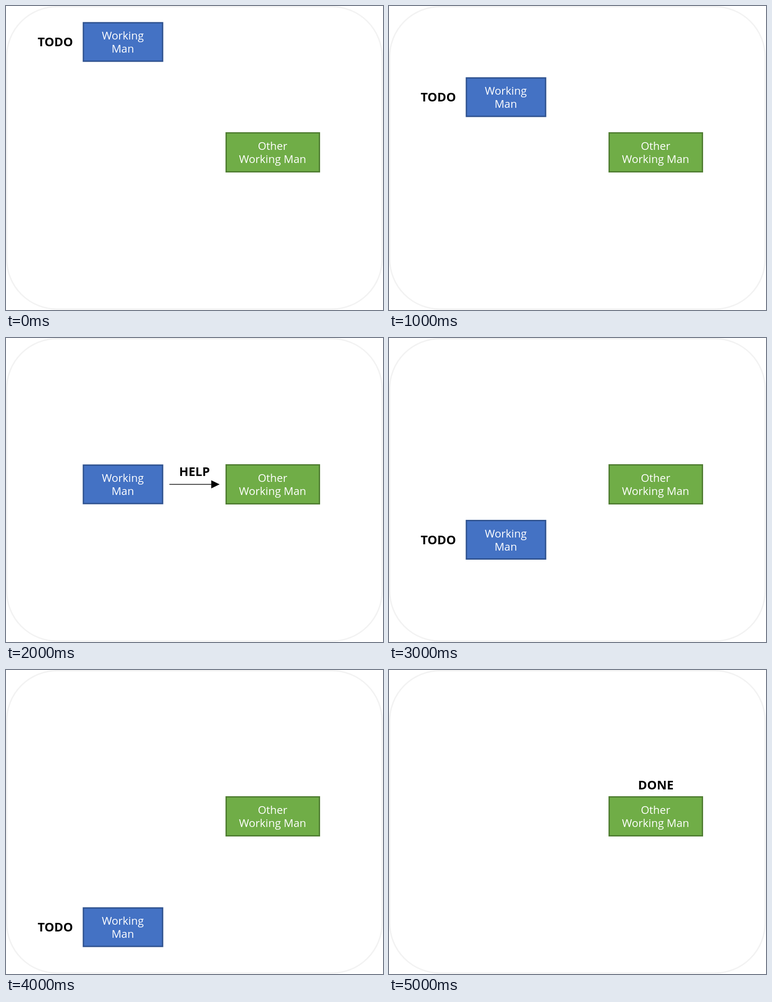
An HTML page for the animation above (6 s loop, 833x672 px).

```html
<!DOCTYPE html>
<html lang="en">
<head>
<meta charset="utf-8">
<title>Working Man</title>
<style>
  html, body { margin: 0; width: 100%; height: 100%; overflow: hidden; background: #fff; }
  svg { display: block; width: 833px; height: 672px; }
  text { font: 24px "Open Sans", "Noto Sans", sans-serif; fill: #fff; text-anchor: middle; }
  .label { font-size: 27px; font-weight: 700; fill: #000; }
  .box { stroke-width: 3; }
  .worker, .todo, .help, .done { animation: 6s step-end infinite; }
  .worker { animation-name: descend; }
  .todo { animation-name: todo; }
  .help { animation-name: help; }
  .done { animation-name: done; }

  @keyframes descend {
    0% { transform: translateY(0); visibility: visible; }
    16.666% { transform: translateY(122px); }
    33.333% { transform: translateY(244px); }
    50% { transform: translateY(366.5px); }
    66.666% { transform: translateY(489px); visibility: visible; }
    83.333%, 100% { transform: translateY(489px); visibility: hidden; }
  }
  @keyframes todo {
    0% { opacity: 1; }
    33.333% { opacity: 0; }
    50%, 100% { opacity: 1; }
  }
  @keyframes help {
    0% { opacity: 0; }
    33.333% { opacity: 1; }
    50%, 100% { opacity: 0; }
  }
  @keyframes done {
    0% { opacity: 0; }
    83.333%, 100% { opacity: 1; }
  }
</style>
</head>
<body>
<svg viewBox="0 0 833 672">
  <rect x="1.5" y="1.5" width="829.5" height="668.5" rx="111" fill="#fff" stroke="#f2f2f2" stroke-width="3"/>

  <g class="worker">
    <text class="label todo" x="109" y="89">TODO</text>
    <rect class="box" x="171" y="37" width="175" height="85" fill="#4472c4" stroke="#2f528f"/>
    <text x="258" y="74">Working</text>
    <text x="258" y="103">Man</text>
  </g>

  <g class="help">
    <text class="label" x="416.5" y="305">HELP</text>
    <path d="M361 323.5H456" stroke="#000" stroke-width="1.5"/>
    <path d="M453.5 314.5L472 323.5L453.5 332.5Z"/>
  </g>

  <text class="label done" x="589.5" y="264">DONE</text>
  <rect class="box" x="486.5" y="280.5" width="206" height="86" fill="#70ad47" stroke="#507e32"/>
  <text x="589" y="318">Other</text>
  <text x="589" y="347">Working Man</text>
</svg>
</body>
</html>
```
